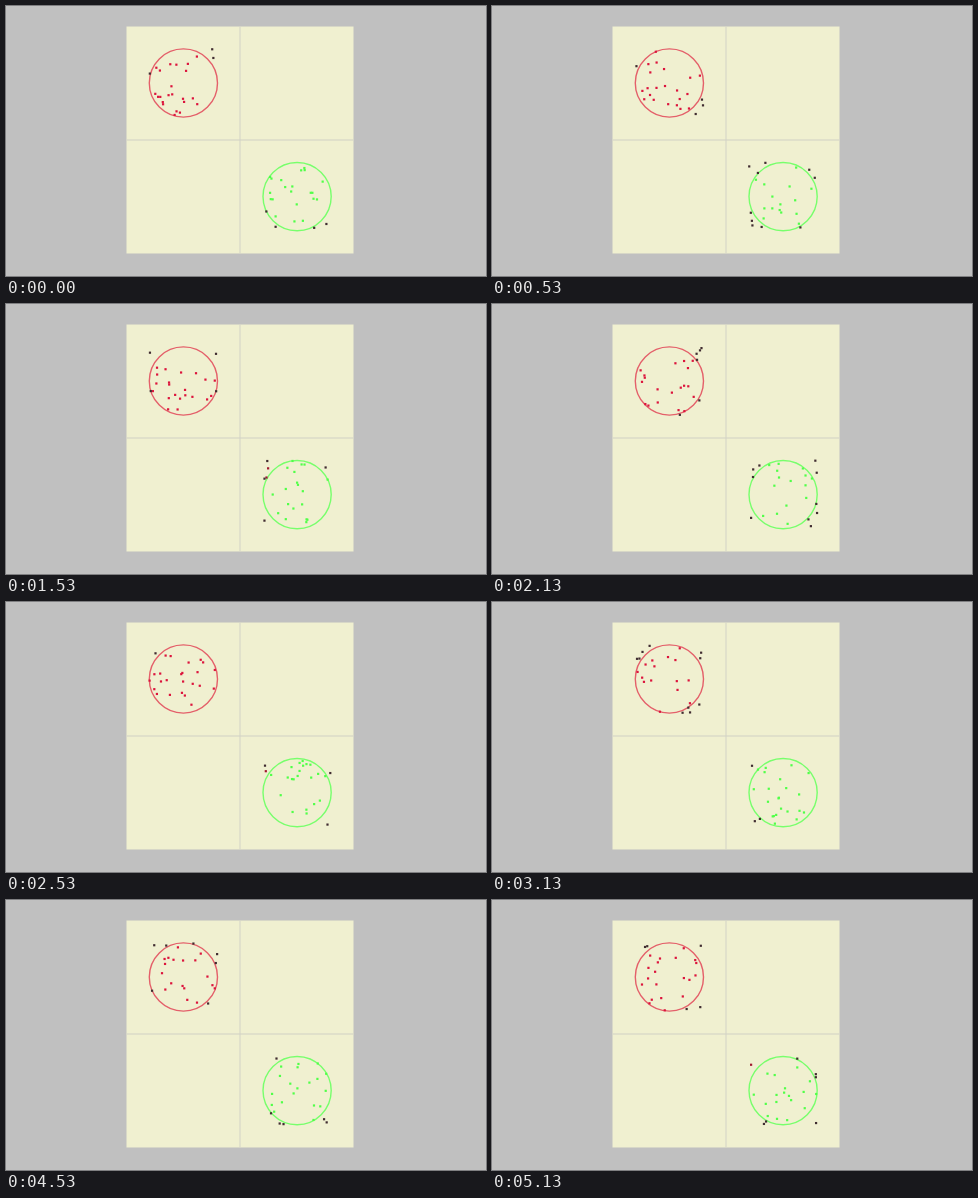
An HTML page with a canvas for the animation above (5270 ms loop, 480 px wide and 270 px high).

```html
<!DOCTYPE html>
<html>
<head>
<meta charset="utf-8">
<style>
html, body { margin: 0; overflow: hidden; background: #c0c0c0; }
canvas { display: block; }
</style>
</head>
<body>
<canvas width="480" height="270"></canvas>
<script>
const ctx = document.querySelector('canvas').getContext('2d');
const LOOP = 5270, R = 34.1, COUNT = 25, DOT = 2.2;

// Moments at which a fresh sample of points is drawn
const steps = [0, 70, 4270];
for (let t = 130; t < LOOP; t += 200) steps.push(t);

const panels = [
  { x: 177.4, y: 77, ring: '#e4606a', dot: '#dc143c', stray: '#60f050' },
  { x: 291.1, y: 190.6, ring: '#78ff6c', dot: '#50ff48', stray: '#a01830' }
];

function random(seed) {
  return () => {
    seed = seed + 0x6D2B79F5 | 0;
    let v = Math.imul(seed ^ seed >>> 15, 1 | seed);
    v = v + Math.imul(v ^ v >>> 7, 61 | v) ^ v;
    return ((v ^ v >>> 14) >>> 0) / 4294967296;
  };
}

function drawPanel(p, seed) {
  ctx.strokeStyle = p.ring;
  ctx.lineWidth = 1.4;
  ctx.beginPath();
  ctx.arc(p.x, p.y, R, 0, 2 * Math.PI);
  ctx.stroke();

  // Uniform points in the square around the ring, coloured by being inside it
  const rnd = random(seed);
  for (let i = 0; i < COUNT; i++) {
    const dx = (rnd() * 2 - 1) * R, dy = (rnd() * 2 - 1) * R;
    const odd = rnd() < 0.05;
    const inside = Math.hypot(dx, dy) < R;
    ctx.fillStyle = inside ? p.dot : odd ? p.stray : '#402c30';
    ctx.fillRect(p.x + dx - DOT / 2, p.y + dy - DOT / 2, DOT, DOT);
  }
}

function draw(now) {
  const t = now % LOOP;
  const step = steps.filter(s => s <= t).length;
  ctx.fillStyle = '#c0c0c0';
  ctx.fillRect(0, 0, 480, 270);
  ctx.fillStyle = '#f0f0d0';
  ctx.fillRect(120.5, 20.5, 227, 227);
  ctx.fillStyle = '#d2d2c6';
  ctx.fillRect(233.5, 20.5, 1, 227);
  ctx.fillRect(120.5, 133.5, 227, 1);
  panels.forEach((p, i) => drawPanel(p, step * 97 + i * 5003));
}

const start = performance.now();
function tick() {
  draw(performance.now() - start);
  requestAnimationFrame(tick);
}
tick();
</script>
</body>
</html>
```
